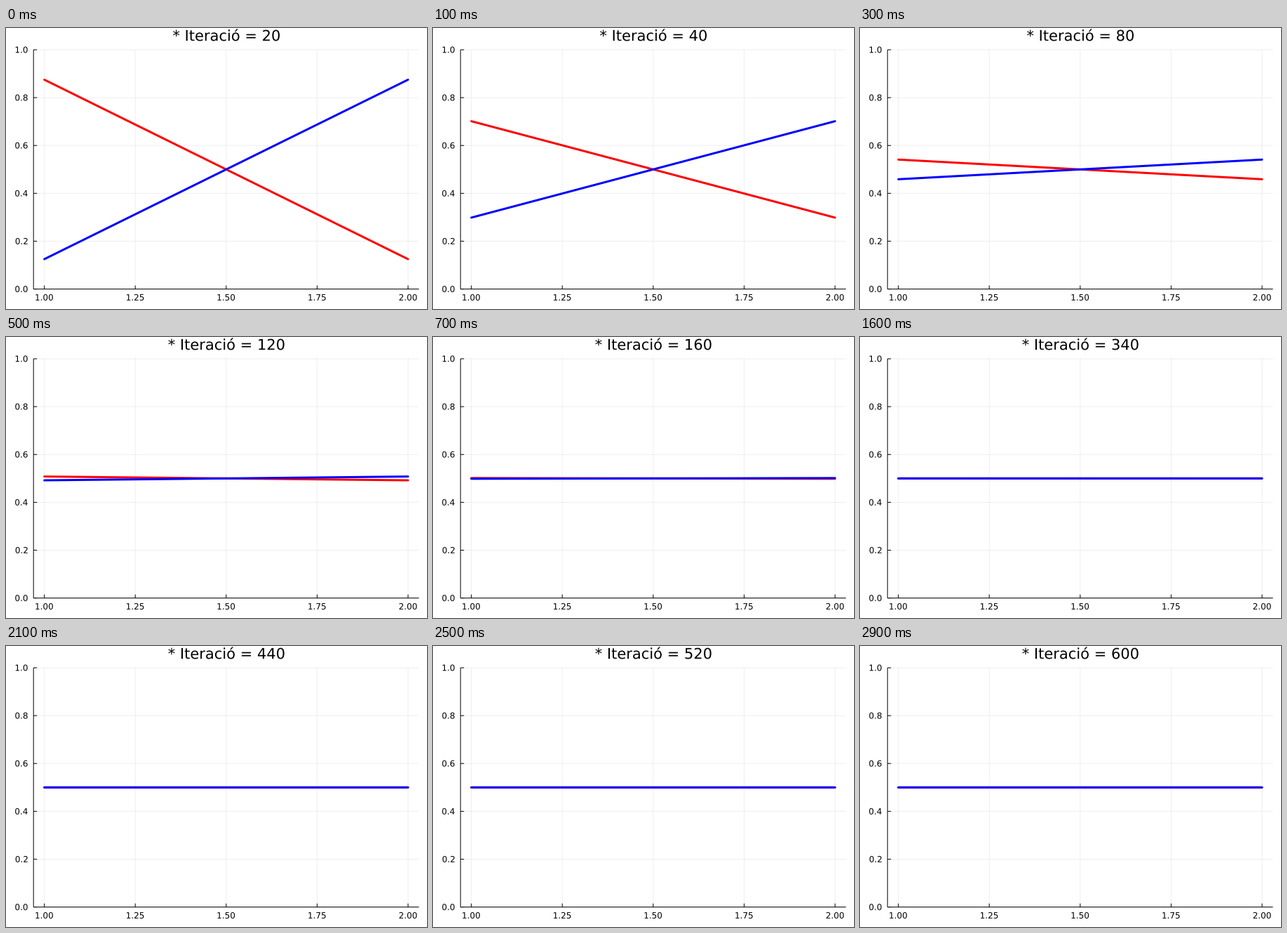
A matplotlib script that plays this animation: 600x400 px, repeating every 3000 ms.

```python
import numpy as np
import matplotlib.pyplot as plt
from matplotlib.animation import FuncAnimation
from matplotlib.patches import PathPatch
from matplotlib.textpath import TextPath
from matplotlib.transforms import Affine2D

W, H, DPI = 600, 400, 100
FRAMES, INTERVAL, STEP = 30, 100, 20
PX = 72 / DPI  # one pixel in points

LEFT, RIGHT, TOP, BOTTOM = 39.2, 588.5, 31.0, 371.6
X1, X2 = 54.6, 573.0  # pixel columns of x = 1 and x = 2

fig = plt.figure(figsize=(W / DPI, H / DPI), dpi=DPI, facecolor="white")
ax = fig.add_axes([0, 0, 1, 1])
ax.set_xlim(0, W)
ax.set_ylim(H, 0)
ax.axis("off")


def x_px(x):
    return X1 + (x - 1) * (X2 - X1)


def y_px(y):
    return BOTTOM - y * (BOTTOM - TOP)


def stroke(xs, ys, color="black", width=1.0, cap="butt", **kw):
    line, = ax.plot(xs, ys, color=color, lw=width * PX, snap=False,
                    solid_capstyle=cap, **kw)
    return line


def text_path(text, size, x, baseline, align):
    """Outline of the text, centred or right-aligned at x."""
    path = TextPath((0, 0), text, size=size, prop={"family": "DejaVu Sans"})
    box = path.get_extents()
    anchor = box.x1 if align == "right" else (box.x0 + box.x1) / 2
    flip = Affine2D().translate(-anchor, 0).scale(1, -1).translate(x, baseline)
    return flip.transform_path(path)


def label(*args):
    return ax.add_patch(PathPatch(text_path(*args), fc="black", lw=0))


def title_path(iteration):
    return text_path(f"* Iteració = {iteration}", 21, 314, 18.2, "center")


def spread(iteration):
    """Distance of both states from 0.5, decaying towards consensus."""
    start, later = np.arctanh(0.75), np.arctanh(0.0822)
    rate = (later / start) ** (1 / 60)
    return 0.5 * np.tanh(start * rate ** (iteration - 20))


x_ticks = np.linspace(1, 2, 5)
y_ticks = np.linspace(0, 1, 6)

for x in x_ticks:
    stroke([x_px(x)] * 2, [TOP, BOTTOM], alpha=0.065, zorder=1)
    stroke([x_px(x)] * 2, [BOTTOM - 5, BOTTOM], zorder=2)
    label(f"{x:.2f}", 12, x_px(x), 387.8, "center")

for y in y_ticks:
    stroke([LEFT, RIGHT], [y_px(y)] * 2, alpha=0.065, zorder=1)
    stroke([LEFT, LEFT + 5], [y_px(y)] * 2, zorder=2)
    label(f"{y:.1f}", 12, 30.7, y_px(y) + 4.3, "right")

stroke([LEFT] * 2, [TOP, BOTTOM], zorder=2)
stroke([LEFT, RIGHT], [BOTTOM] * 2, zorder=2)

red = stroke([X1, X2], [0, 0], "red", 3, "round", zorder=3)
blue = stroke([X1, X2], [0, 0], "blue", 3, "round", zorder=4)
title = ax.add_patch(PathPatch(title_path(STEP), fc="black", lw=0))


def update(frame):
    iteration = STEP * (frame + 1)
    d = spread(iteration)
    high, low = y_px(0.5 + d), y_px(0.5 - d)
    red.set_ydata([high, low])
    blue.set_ydata([low, high])
    title.set_path(title_path(iteration))
    return red, blue, title


anim = FuncAnimation(fig, update, frames=FRAMES, interval=INTERVAL,
                     init_func=lambda: update(0), repeat=True, repeat_delay=0)
plt.show()
```
